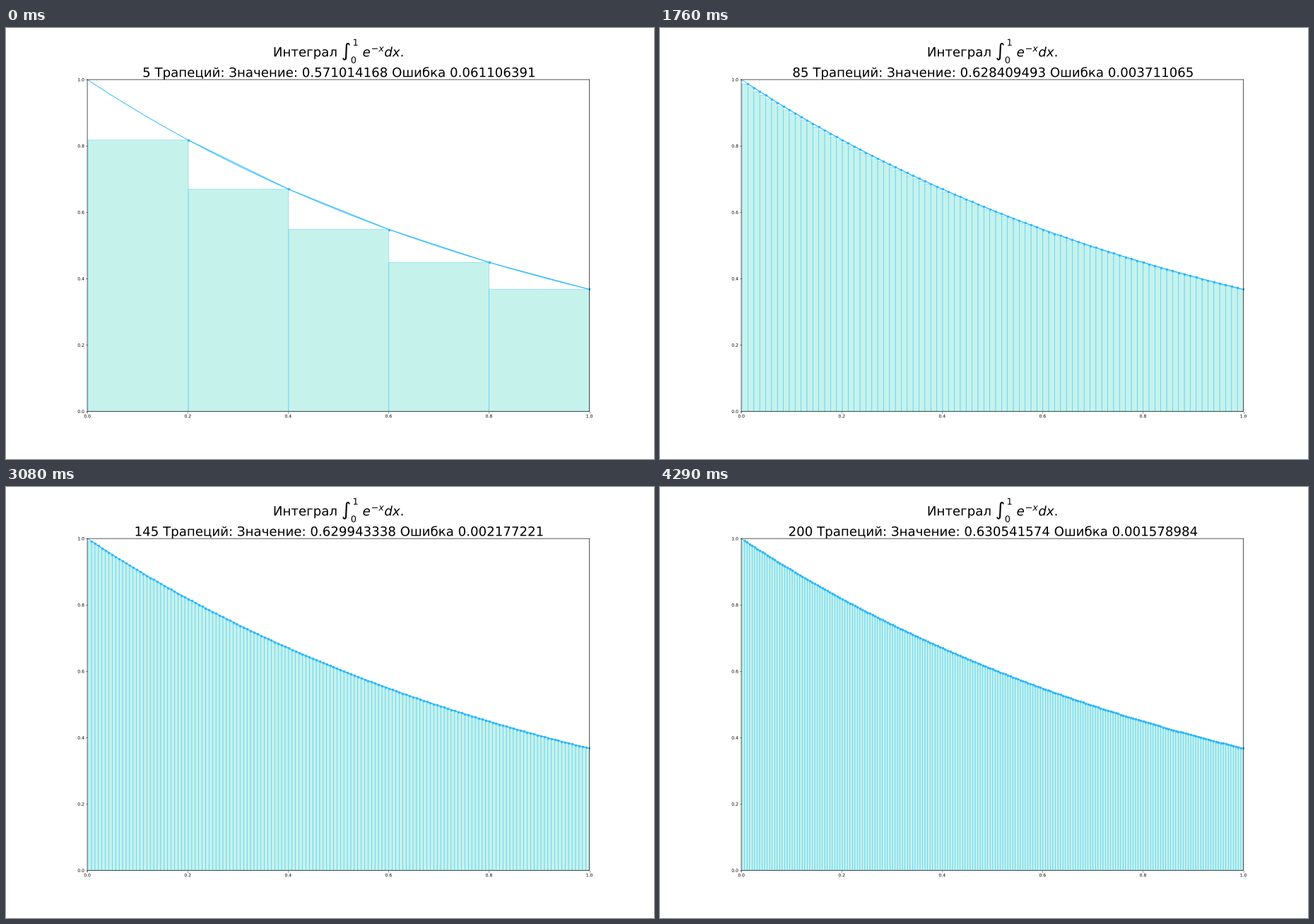
Animation of 917x611 px, one loop 4.4 s. Source, as a matplotlib script:

```python
import numpy as np
import matplotlib.pyplot as plt
from matplotlib.animation import FuncAnimation
from matplotlib.collections import PolyCollection
from matplotlib.patheffects import Normal

W, H = 917, 611
DPI = W / 21
FRAMES, INTERVAL = 40, 110
STEP = 5
START = 0.0015  # left end of the plotted nodes

BLUE = "#29b8ff"
FILL = (68 / 255, 212 / 255, 195 / 255, 0.3)
EDGE = (0.2, 0.78, 1, 0.62)

plt.rcParams.update({
    "font.family": "DejaVu Sans",
    "text.hinting": "none",
    "axes.linewidth": 1.1,
    "xtick.major.width": 0.9,
    "ytick.major.width": 0.9,
})


def f(x):
    return np.exp(-x)


EXACT = 1 - np.exp(-1)


def right_sum(n):
    return f(np.arange(1, n + 1) / n).sum() / n


def bar_corners(x):
    """Rectangles between neighbouring nodes, as high as f at the right one."""
    left, right = x[:-1], x[1:]
    top, zero = f(right), np.zeros(len(left))
    return np.stack([
        np.column_stack([left, zero]),
        np.column_stack([left, top]),
        np.column_stack([right, top]),
        np.column_stack([right, zero]),
    ], axis=1)


fig, ax = plt.subplots(figsize=((W + 1e-6) / DPI, (H + 1e-6) / DPI), dpi=DPI)
fig.subplots_adjust(left=263.5 / 2100, right=1890.5 / 2100,
                    bottom=154.5 / 1400, top=1232.5 / 1400)
ax.set(xlim=(0, 1), ylim=(0, 1))
for spine in ax.spines.values():
    spine.set_snap(False)

bars = PolyCollection([], facecolors=[FILL], edgecolors=[EDGE],
                      linewidths=1, zorder=1)
bars.set_snap(False)
ax.add_collection(bars, autolim=False)

grid = np.linspace(0, 1, 200)
ax.plot(grid, f(grid), color=BLUE, lw=1.5)
chords, = ax.plot([], [], "o-", color=BLUE, lw=1.5, ms=4.8)
chords.set_snap(False)

# Drawing text as outlines keeps its sub-pixel positions.
title = ax.set_title("", fontsize=30)
for text in [title, *ax.get_xticklabels(), *ax.get_yticklabels()]:
    text.set_path_effects([Normal()])


def draw(k):
    n = STEP * (k + 1)
    x = np.linspace(START, 1, n + 1)
    bars.set_verts(bar_corners(x))
    chords.set_data(x[1:], f(x[1:]))
    value = right_sum(n)
    title.set_text(
        "Интеграл $\\int_0^1\\ e^{-x}dx.$\n"
        f"{n} Трапеций: Значение: {value:.9f} Ошибка {EXACT - value:.9f}")
    return bars, chords, title


anim = FuncAnimation(fig, draw, frames=FRAMES, interval=INTERVAL,
                     repeat=True, repeat_delay=0, blit=False)
plt.show()
```
